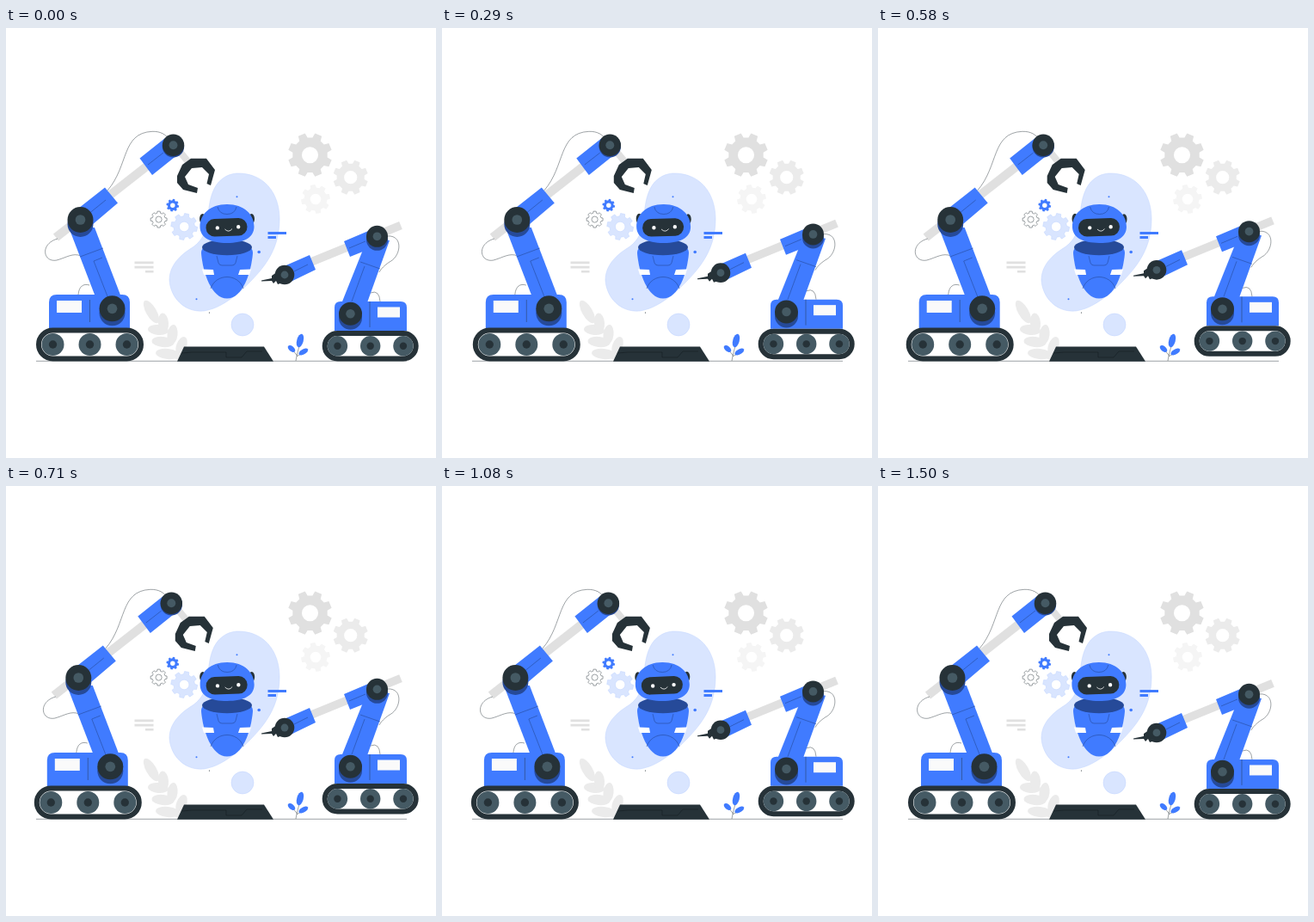
These frames come from a looping animation (500 by 500 pixels, 1.54 s). An HTML page:

```html
<!DOCTYPE html>
<html lang="en">
<head>
<meta charset="utf-8">
<title>Robot workshop</title>
<style>
  html, body { margin: 0; width: 100%; height: 100%; overflow: hidden; background: #fff; }
  svg { display: block; width: 100%; height: 100%; }
  .blue { fill: #407bff; }
  .shade { fill: #264a99; }
  .dark { fill: #263238; }
  .slate { fill: #455a64; }
  .pale { fill: #d9e5ff; stroke: #bfd3ff; stroke-width: .5; }
  .white { fill: #fff; }
  .pane { fill: #fafafa; }
  .leaf { fill: #ebebeb; }
  .rod { stroke: #e0e0e0; }
  .wire { fill: none; stroke: #263238; stroke-width: .45; }
  .seam { fill: none; stroke: #264a99; stroke-width: .6; }
  .tread { fill: #fff; stroke: #263238; stroke-width: 6; }
</style>
</head>
<body>
<svg viewBox="0 0 500 500">
  <path class="pale" d="M268 169C300 168 318 192 318 222C318 254 304 275 283 296C268 311 250 326 230 329C206 331 191 312 190 293C190 278 200 266 214 257C226 250 232 240 234 226C236 210 236 200 242 187C247 177 256 170 268 169Z"/>
  <circle class="pale" cx="275" cy="345" r="13"/>
  <g id="gears"></g>

  <g class="blue">
    <circle cx="268.5" cy="196.3" r="1"/>
    <circle cx="294.2" cy="260.5" r="1.8"/>
    <circle cx="221.5" cy="315.2" r="1"/>
    <path d="M304.5 237H326V240H304.5ZM304.5 242H314V245H304.5Z"/>
  </g>
  <circle class="dark" cx="236.5" cy="331" r=".6"/>
  <path fill="#e0e0e0" d="M149.5 271.5H171.5V274.3H149.5ZM149.5 276.7H171.5V279.5H149.5ZM162 282H171.5V284.6H162Z"/>

  <g id="bush" class="leaf"></g>
  <path class="wire" d="M35 387.3H466"/>
  <path class="wire" d="M337 387C338 380 340 374 342 366M338.5 381L333 374M338 382L346 377"/>
  <g id="sprout" class="blue"></g>
  <path class="dark" d="M207 370.5H300L311 387.7H199Z"/>
  <path fill="none" stroke="#11191d" stroke-width=".5" d="M204 378L216 377H256V383H274L280 376H298"/>

  <path class="blue" d="M227 262C226 242 288 242 287 262C285 285 275 314.5 257 314.5C239 314.5 229 285 227 262Z"/>
  <ellipse class="shade" cx="257" cy="255" rx="29" ry="9.3"/>
  <path class="white" d="M228 280.5L241 281L242 287H230ZM272 281L285 280.5L283 287H270Z"/>
  <path class="seam" d="M245 265L247 273Q248 276 251 276H263Q266 276 267 273L269 265M238 303C244 285 270 285 276 303"/>
  <g id="head">
    <ellipse class="dark" cx="228.5" cy="222" rx="3.5" ry="6"/>
    <ellipse class="dark" cx="285.5" cy="222" rx="3.5" ry="6"/>
    <path class="blue" d="M257 205C277 205 288.5 217 288.5 231C288.5 244 276 250 257 250C238 250 225.5 244 225.5 231C225.5 217 237 205 257 205Z"/>
    <path class="seam" d="M246 208Q248 216.5 257 216.5Q266 216.5 268 208"/>
    <rect class="dark" x="232.5" y="221.5" width="48" height="20.5" rx="10" transform="rotate(-2 257 232)"/>
    <circle class="white" cx="245.8" cy="232.4" r="2.2"/>
    <circle class="white" cx="270.2" cy="231.2" r="2.2"/>
    <path d="M254.5 234Q259 238.5 263 233.5" fill="none" stroke="#fff" stroke-width=".8"/>
  </g>

  <g id="left">
    <path class="rod" stroke-width="10" d="M58 243.5L180 148"/>
    <path class="rod" stroke-width="8" d="M199 140L213 157"/>
    <path class="wire" d="M118 189C143 160 134 122 170 120.3C180 120 186 124 190 130M60 245C39 251 43 273 59 270C70 267 78 261 87 265M84 310C85 300 90 297 97 299"/>
    <path class="dark" d="M199 172L205 159L215 151.8H233L243 165L238 183L233.5 181L236 170L228 162L216 163L208 173L212 182L223 186L222 192L206 188L199 180Z"/>
    <path class="blue" d="M50 349V319Q50 310 59 310H135Q144 310 144 319V349Z"/>
    <path class="pane" d="M59 317H88V331H59Z"/>
    <path class="wire" d="M97.5 316V342"/>
    <path class="blue" d="M115 185.5L130 203.5L100 229L80 213ZM155.5 151.5L170 171L200 147L185 128Z"/>
    <path class="seam" d="M95 217L116 200M165 159L183 145"/>
    <path class="blue" d="M73 232L103 232L139 326L108 323Z"/>
    <path class="seam" d="M86 266L113 256M118 312L102 271L112 267"/>
    <g id="leftJoints"></g>
  </g>

  <g id="right">
    <path class="rod" stroke-width="9.5" d="M350 274L459 229.5"/>
    <path class="wire" d="M443 242C462 240 460 265 446 272C440 276 436 280 434 284M424 308Q434 304 435 318"/>
    <path class="blue" d="M382 352V325Q382 318 389 318H459Q466 318 466 325V352Z"/>
    <path class="pane" d="M432 324.5H458V336.5H432Z"/>
    <path class="wire" d="M423 318V348"/>
    <path class="blue" d="M353 264L360 281L329 296L321 278ZM393 248L426 234L440 250L400 266Z"/>
    <path class="seam" d="M335 283L351 275M399 256L418 248"/>
    <path class="blue" d="M421 243L446 247L414 336L387 328Z"/>
    <path class="seam" d="M412 272L435 280M402 318L417 277"/>
    <path class="dark" d="M318 282L309 288V291L297 293.5V294.5L309 294L311 297L314 294L316 298L322 296Z"/>
    <g id="rightJoints"></g>
  </g>
</svg>

<script>
const LOOP = 1540;
const $ = id => document.getElementById(id);
const repeat = (n, make) => Array.from({ length: n }, (_, i) => make(i)).join('');
const circle = (kind, x, y, r) => `<circle class="${kind}" cx="${x}" cy="${y}" r="${r}"/>`;
const leaf = (x, y, rx, ry, angle) =>
  `<ellipse rx="${rx}" ry="${ry}" transform="translate(${x} ${y}) rotate(${angle})"/>`;

function gear(x, y, r, turn, style) {
  const teeth = 8, hole = r * .37;
  const outline = repeat(teeth * 4, i => {
    const side = i % 4;
    const tip = side === 1 || side === 2;
    const offset = (tip ? .21 : .32) * (side < 2 ? -1 : 1);
    const a = (Math.floor(i / 4) + offset + turn) * 2 * Math.PI / teeth;
    const size = tip ? r : r * .79;
    return `${i ? 'L' : 'M'}${x + size * Math.cos(a)} ${y + size * Math.sin(a)}`;
  });
  const ring = `M${x - hole} ${y}a${hole} ${hole} 0 1 0 ${2 * hole} 0a${hole} ${hole} 0 1 0 ${-2 * hole} 0Z`;
  return `<path fill-rule="evenodd" ${style} d="${outline}Z${ring}"/>`;
}

// A joint is a dark disc with a slate hub and an optional shade below it.
const joint = (x, y, r, drop) =>
  (drop ? circle('shade', x, y + drop, r) : '') + circle('dark', x, y, r) + circle('slate', x, y, r * .39);

function tread(x, y, w, h, r) {
  const first = x + h / 2, gap = (w - h) / 2;
  return `<rect class="tread" x="${x}" y="${y}" width="${w}" height="${h}" rx="${h / 2}"/>` +
    repeat(3, i => circle('slate', first + i * gap, y + h / 2, r) + circle('dark', first + i * gap, y + h / 2, r * .36));
}

$('gears').innerHTML =
  gear(353.5, 147.7, 25.8, .5, 'fill="#e0e0e0"') +
  gear(400.7, 173.7, 20.5, .5, 'fill="#ebebeb"') +
  gear(360, 199, 17, .75, 'fill="#f5f5f5"') +
  gear(207.2, 231, 15.5, .25, 'class="pale"') +
  gear(177.6, 222.6, 9.6, 0, 'class="wire"') +
  gear(193.8, 206.2, 7.4, .25, 'class="blue"');

$('bush').innerHTML = leaf(169, 330, 15, 6, 60) +
  repeat(3, i => leaf(177 + 5.5 * i, 351 + 14 * i, 12 + i, 6, 6) + leaf(183 + 10.5 * i, 343 + 13.5 * i, 11.5, 6, 85 + 12 * i)) +
  leaf(202, 381, 8, 5, 0);
$('sprout').innerHTML = leaf(342, 363.5, 8, 3.8, 105) + leaf(332, 373, 5, 3, 40) + leaf(345.8, 376.5, 6, 3, -30);

$('leftJoints').innerHTML =
  joint(194.5, 136.3, 12.7, 1.5) + joint(86.5, 223, 15, 5) + joint(123.5, 326.3, 15, 5) +
  tread(38, 351.5, 119, 33, 13);
$('rightJoints').innerHTML =
  joint(324, 287, 11.3, 0) + joint(431.5, 242.3, 12.5, 4) + joint(400.5, 332.3, 13.5, 5) +
  tread(370.7, 355, 106, 29.5, 11.7);

// Smooth step from 0 to 1 between two times.
function ease(t, start, end) {
  const u = Math.min(1, Math.max(0, (t - start) / (end - start)));
  return u * u * (3 - 2 * u);
}

function draw(now) {
  const t = now % LOOP;
  const slide = ease(t, 0, 240) - 3.3 * ease(t, 240, 580) + 2.3 * ease(t, 600, LOOP);
  const lift = 6 * (ease(t, 680, LOOP) - ease(t, 0, 680));
  const sway = .5 * Math.sin(2 * Math.PI * t / LOOP);
  $('left').setAttribute('transform', `translate(${slide} 0)`);
  $('right').setAttribute('transform', `translate(0 ${lift})`);
  $('head').setAttribute('transform', `translate(${sway} 0) rotate(${sway} 257 250)`);
  requestAnimationFrame(draw);
}
draw(performance.now());
</script>
</body>
</html>
```
